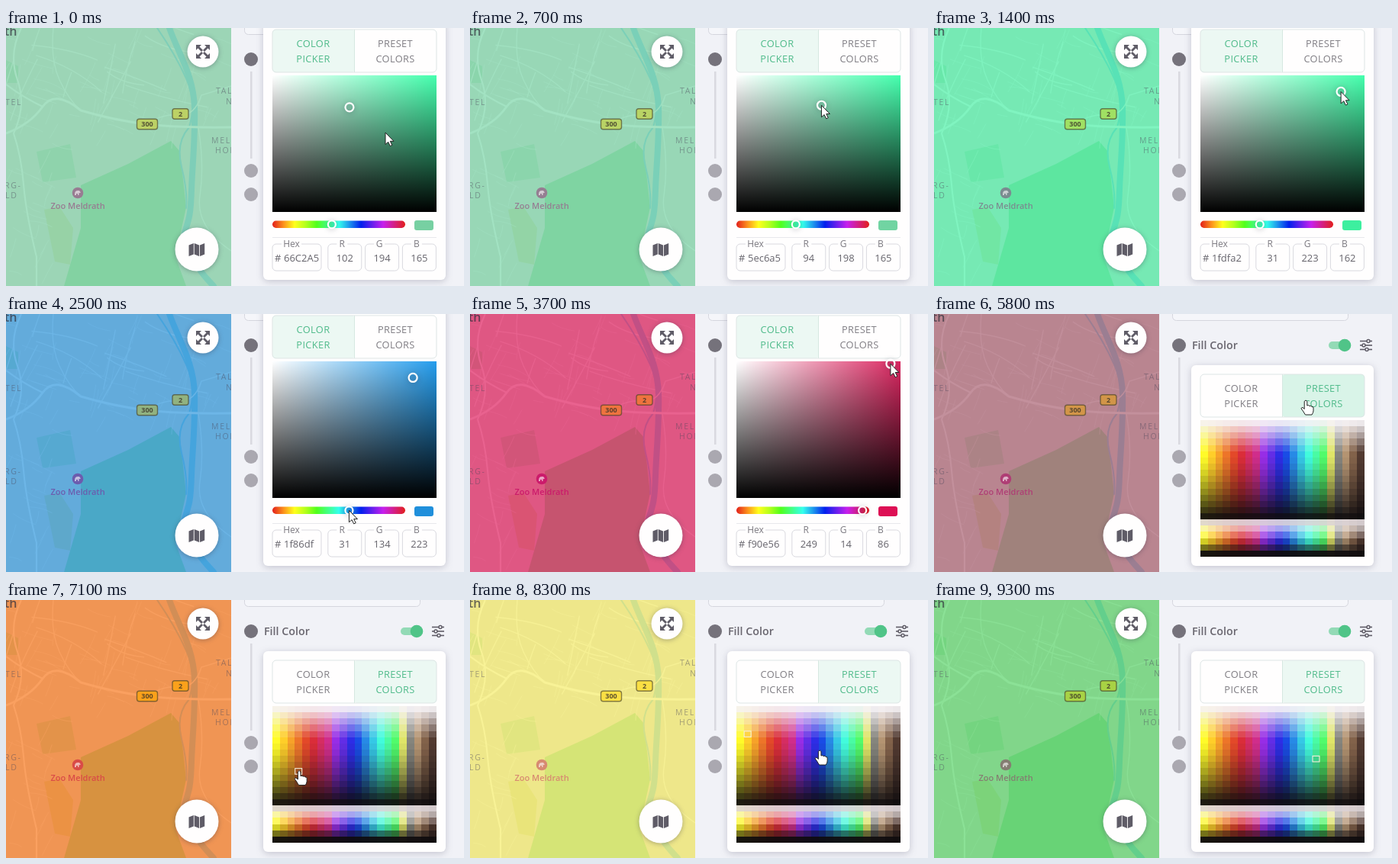
Recreate the animation shown at these times as an HTML page. Size 600 px wide and 338 px high, loop 9400 ms.

```html
<!DOCTYPE html>
<html lang="en">
<head>
<meta charset="utf-8">
<title>Map fill color</title>
<style>
  html, body { margin: 0; width: 100%; height: 100%; overflow: hidden; background: #f1f2f7; }
  svg { display: block; width: 100vw; height: 100vh; font-family: "Open Sans", "Noto Sans", sans-serif; }
  .card { filter: drop-shadow(0 2px 5px rgba(60, 60, 90, .25)); }
  .button { filter: drop-shadow(0 1px 3px rgba(40, 40, 60, .35)); }
  .tab { font-size: 12.8px; letter-spacing: .35px; text-anchor: middle; }
  .value { font-size: 13px; fill: #66646c; }
  .legend { font-size: 12px; fill: #7c7a81; text-anchor: middle; }
  .place { font-size: 10.5px; letter-spacing: 1.7px; fill: #4a465a; opacity: .45; }
  .shield { font-size: 9px; font-weight: 700; text-anchor: middle; fill: #3a3328; opacity: .8; }
  .city { font-size: 16px; font-weight: 600; fill: #30303c; opacity: .7; }
  .poi { font-size: 11px; font-weight: 600; text-anchor: middle; }
  .title { font-size: 14.3px; font-weight: 600; fill: #69666f; }
</style>
</head>
<body>
<svg id="stage" viewBox="0 0 600 338" preserveAspectRatio="none">
  <defs>
    <clipPath id="mapClip"><rect width="295" height="338"/></clipPath>
    <linearGradient id="white"><stop stop-color="#fff"/><stop offset="1" stop-color="#fff" stop-opacity="0"/></linearGradient>
    <linearGradient id="black" x2="0" y2="1"><stop stop-opacity="0"/><stop offset="1"/></linearGradient>
    <linearGradient id="hues"></linearGradient>
  </defs>
</svg>
<script>
const LOOP = 9400, STEP = 100;
const stage = document.getElementById('stage');

function add(parent, tag, attrs = {}, text) {
  const el = document.createElementNS('http://www.w3.org/2000/svg', tag);
  for (const k in attrs) el.setAttribute(k, attrs[k]);
  if (text !== undefined) el.textContent = text;
  return parent.appendChild(el);
}
const group = (parent, attrs) => add(parent, 'g', attrs);
const rect = (p, x, y, width, height, fill, more) => add(p, 'rect', { x, y, width, height, fill, ...more });
const circle = (p, cx, cy, r, fill, more) => add(p, 'circle', { cx, cy, r, fill, ...more });
const path = (p, d, more) => add(p, 'path', { d, fill: 'none', ...more });
const label = (p, x, y, text, cls, more) => add(p, 'text', { x, y, class: cls, ...more }, text);
const show = (el, on) => el.setAttribute('display', on ? 'inline' : 'none');

const clamp = (v, top = 1) => Math.min(top, Math.max(0, v));
const ease = k => k * k * (3 - 2 * k);
const mix = (a, b, k) => a.map((v, i) => v + (b[i] - v) * k);
const rgb = c => `rgb(${c.map(v => Math.round(v)).join(',')})`;
const fromHex = h => [0, 2, 4].map(i => parseInt(h.slice(i, i + 2), 16));
const toHex = c => c.map(n => n.toString(16).padStart(2, '0')).join('');

function hsv(h, s, v) {
  return [5, 3, 1].map(n => {
    const k = (n + h / 60 + 6) % 6;
    return 255 * v * (1 - s * clamp(Math.min(k, 4 - k)));
  });
}
function toHsv([r, g, b]) {
  const max = Math.max(r, g, b), d = max - Math.min(r, g, b);
  const sector = max === r ? (g - b) / d + 6 : max === g ? (b - r) / d + 2 : (r - g) / d + 4;
  return [sector % 6 * 60, d / max, max / 255];
}
const recorded = ([r, g, b]) => [.92 * r + .24 * g - .13 * b, 1.07 * g, .98 * b].map(v => clamp(v, 255));

let seed = 11;
const random = () => (seed = seed * 16807 % 2147483647) / 2147483647;

// Map
const map = group(stage, { 'clip-path': 'url(#mapClip)' });
rect(map, 0, 0, 295, 338, '#e2e0de');
path(map, 'M98 206L160 178 216 148 228 162 236 235 222 300 236 338H76L98 262Z', { fill: '#9cd8a4' });
path(map, 'M40 162L84 152 92 196 48 202ZM0 42L16 50V72H0Z', { fill: '#9cd8a4', opacity: .5 });
path(map, 'M50 238L70 234 88 262 84 310 64 306Z', { fill: '#d2d69c', opacity: .7 });

// A seeded web of streets: n strokes inside a box, bent by up to half their length
function streets(n, w, top, bottom, length, look) {
  let d = '';
  for (let i = 0; i < n; i++) {
    const a = (random() < .5 ? .2 : 1.75) + random() * .35, len = length * (.4 + random());
    const dx = Math.cos(a) * len, dy = Math.sin(a) * len, bend = (random() - .5) * len / 2;
    d += `M${random() * w} ${top + random() * (bottom - top)}q${dx / 2 - bend / 2} ${dy / 2 + bend / 2} ${dx} ${dy}`;
  }
  path(map, d, { stroke: '#fff', ...look });
}
streets(75, 280, 0, 140, 32, { 'stroke-width': .8, opacity: .6 });
streets(22, 65, 150, 330, 26, { 'stroke-width': .8, opacity: .6 });
streets(14, 190, -20, 80, 80, { 'stroke-width': 1.4, opacity: .8 });

const water = { stroke: '#8ecbe4', 'stroke-linecap': 'round' };
path(map, 'M214 0C226 34 246 62 247 105S244 180 243 212 240 250 234 268 256 322 272 338', { ...water, 'stroke-width': 8 });
path(map, 'M198 0Q222 35 236 66T240 130Q222 150 230 182T236 236', { ...water, 'stroke-width': 2 });
path(map, 'M0 138Q32 126 48 103T98 108Q142 121 184 126T295 130', { stroke: '#fff', 'stroke-width': 3 });
path(map, 'M20 0Q3 34 15 68T10 138Q20 168 23 205T40 300V338M0 74Q24 92 48 103', { stroke: '#fff', 'stroke-width': 2.2 });
path(map, 'M184 126Q205 112 226 114T256 88L295 76M252 130Q260 180 254 220T295 292M62 0Q58 42 70 68T98 108', { stroke: '#fff', 'stroke-width': 1.4, opacity: .85 });

const shields = [[185, 126, 27, '300'], [228.5, 112.5, 21, '2']];
const shield = ([x, y, w], more) => rect(map, x - w / 2, y - 6.7, w, 13.4, '#ffd52c', { rx: 3, ...more });
shields.forEach(s => shield(s));
const tint = rect(map, 0, 0, 295, 338, '#fff', { opacity: .65 });
shields.forEach(s => {
  shield(s, { 'fill-opacity': .25, stroke: '#4a4428', 'stroke-opacity': .65, 'stroke-width': 1.4 });
  label(map, s[0], s[1] + 3.3, s[3], 'shield');
});

[[-1, 101, 'TEL'], [-2, 210, 'RG-'], [-1, 223, 'LD'], [275, 86, 'TAL'], [288, 100, 'N'], [269, 151, 'MEL'], [274, 164, 'HOF']]
  .forEach(([x, y, text]) => label(map, x, y, text, 'place'));
label(map, -2, 10, 'th', 'city');

const poi = group(map);
circle(poi, 94, 216, 7.3);
path(poi, 'M90 218Q90 213 94 213H96L98 215.5 95.5 216.5V219H94V217H92V219H90Z', { fill: '#fff', opacity: .6 });
label(poi, 94, 237, 'Zoo Meldrath', 'poi');

const ICON = '#5f5c67';
circle(stage, 258, 31, 20.5, '#fffefe', { class: 'button' });
for (let turn = 0; turn < 360; turn += 90) {
  path(stage, 'M-9-9H-2L-4.5-6.5 0-2 -2 0-6.5-4.5-9-2Z', { fill: ICON, transform: `translate(258 31) rotate(${turn})` });
}
circle(stage, 250, 290, 28.5, '#fffefe', { class: 'button' });
[[239.5, 2.5], [246.7, -2.5], [253.9, 2.5]].forEach(([x, slope]) =>
  path(stage, `M${x} ${290.5 - 7.2 + slope / 2}l6.3 ${-slope}v14.5l-6.3 ${slope}Z`, { fill: ICON }));

// Side panel
rect(stage, 295, 0, 305, 338, '#f1f2f7');
rect(stage, 312.5, -20, 230, 28.5, '#f5f6fa', { rx: 5, stroke: '#d5d6de' });
rect(stage, 320, 57, 2.5, 114, '#d9d9e0');
[41, 187, 218].forEach((y, i) => circle(stage, 321, y, 9, i ? '#aaa8b0' : '#75727b'));
label(stage, 338, 46, 'Fill Color', 'title');
rect(stage, 517, 36, 29, 10, '#93dab6', { rx: 5 });
circle(stage, 538, 41, 8.3, '#50c488');
[569, 563, 567].forEach((x, i) => {
  const y = 35.5 + i * 5.5;
  rect(stage, 558, y - .8, 16, 1.6, ICON);
  circle(stage, x, y, 2, '#f1f2f7', { stroke: ICON, 'stroke-width': 1.4 });
});

function makeCard(top, active) {
  const g = group(stage), y = top + 12;
  rect(g, 337, top, 239, 330 - top, '#fffefe', { rx: 6, class: 'card' });
  const tab = rect(g, 349 + active * 107.5, y, 107.5, 56, '#ecf8f3', { rx: 4 });
  rect(g, 349, y, 215, 56, 'none', { rx: 5, stroke: '#dde5e5' });
  rect(g, 456, y, 1, 56, '#d6e8e1');
  ['COLOR', 'PICKER', 'PRESET', 'COLORS'].forEach((word, i) => {
    const side = i >> 1;
    label(g, 402.5 + side * 107.5, y + 22.5 + i % 2 * 20.5, word, 'tab', { fill: side === active ? '#50bb8b' : '#807e84' });
  });
  return { g, tab };
}

// Color picker
const picker = makeCard(-10, 0).g;
const shade = rect(picker, 349, 62, 215, 179);
rect(picker, 349, 62, 215, 179, 'url(#white)');
rect(picker, 349, 62, 215, 179, 'url(#black)');
for (let i = 0; i <= 12; i++) {
  add(document.getElementById('hues'), 'stop', { offset: i / 12, 'stop-color': rgb(recorded(hsv(i * 30, .88, .95))) });
}
rect(picker, 349, 252.5, 174, 9.5, 'url(#hues)', { rx: 4.7 });
const ringLook = { stroke: '#fff', 'stroke-width': 2.2, class: 'button' };
const ring = circle(picker, 0, 0, 5.5, 'none', ringLook);
const knob = circle(picker, 0, 0, 5, 'none', ringLook);
const swatch = rect(picker, 535, 252, 25, 13, '#fff', { rx: 3 });
rect(picker, 349, 274, 215, 1, '#e8e8ec');
const fields = ['Hex', 'R', 'G', 'B'].map((name, i) => {
  const x = i ? 373 + i * 48.8 : 349, w = i ? 44 : 64, gap = i ? 14 : 26;
  const mid = x + (i ? 18.5 : 25);
  rect(picker, x, 283, w, 35, 'none', { rx: 5, stroke: '#d9d9df' });
  rect(picker, mid - gap / 2, 281, gap, 4, '#fffefe');
  label(picker, mid, 287, name, 'legend');
  return label(picker, i ? x + w / 2 : 364, 305.5, '', 'value', { 'text-anchor': i ? 'middle' : 'start' });
});
label(picker, 352, 305.5, '#', 'value');

// Preset palette: a wheel of hues, then five earth tones
const { g: presets, tab: presetTab } = makeCard(67, 1);
const CELLS = 22, CW = 215 / CELLS, CH = 179 / CELLS;
const earth = ['dfe568', '85857d', 'b49472', '82624a', '523a30'].map(fromHex);
const hueOf = col => col < 8 ? 60 - 13 * col : 429 - 18 * col;
const columnColor = col => earth[col - 17] || recorded(hsv((hueOf(col) + 360) % 360, .82, .92));
function presetColor(col, row) {
  const c = columnColor(col), light = [246, 243, 246], dark = [14, 11, 13];
  if (row < 5) return mix(light, c, (row + .3) / 5);
  if (row < 16) return mix(c, dark, ((row - 5) / 10.5) ** 1.4);
  if (row === 16) return mix([222, 214, 218], c, .08);
  return row < 19 ? mix(light, c, (row - 15.8) / 3) : mix(c, dark, (row - 18.5) / 2.6);
}
const cellX = col => 349 + col * CW, cellY = row => 139 + row * CH;
for (let i = 0; i < CELLS * CELLS; i++) {
  const col = i % CELLS, row = Math.floor(i / CELLS);
  rect(presets, cellX(col), cellY(row), CW, CH, rgb(presetColor(col, row)), { 'shape-rendering': 'crispEdges' });
}
const picked = rect(presets, 0, 0, CW - .8, CH - .6, 'none', { stroke: '#f4eedc', 'stroke-width': 1.1 });

// Pointers, tips at 0,0
const ink = { fill: '#fff', stroke: '#222', 'stroke-linejoin': 'round' };
const arrow = path(stage, 'M0 0V15.5L3.7 12.3 6.2 17.6 8.8 16.4 6.3 11.3H11Z', ink);
const hand = path(stage, 'M-1.8 1.4Q0-1.4 1.8 1.4V7Q4 5.8 5 7.6 7 6.5 8 8.5 10 8 10 10V14Q9.8 16.5 8 19H-.5Q-2 17-3 15L-6 10.8Q-5.4 8.2-3 10.2L-1.8 11.5Z', ink);

// Story: where the pointer goes, and which color it drags or clicks on the way
const MINT = '66C2A5';
const [mint, green, pink, mauve] = [MINT, '1fdfa2', 'f90e56', 'ad4f6a'].map(h => toHsv(fromHex(h)));
const ringAt = ([, s, v]) => [348 + s * 215, 61 + (1 - v) * 179];
const knobAt = ([h]) => [349 + h / 360 * 174, 257.3];
const cellAt = ([col, row]) => [cellX(col + .6), cellY(row + .4)];

const START = [497, 137], DRAG = 500, SWITCH = 5400, GONE = 9000, FADE = 300;
const moves = [
  { at: 0, ms: 500, to: ringAt(mint) },
  { at: DRAG, ms: 900, to: ringAt(green), color: green },
  { at: 1700, ms: 600, to: knobAt(green) },
  { at: 2300, ms: 600, to: knobAt(pink), color: [pink[0], green[1], green[2]] },
  { at: 2900, ms: 300, to: ringAt(green) },
  { at: 3200, ms: 400, to: ringAt(pink), color: pink },
  { at: 3900, ms: 700, to: ringAt(mauve), color: mauve },
  { at: 4800, ms: 400, to: [487, 40] },
  { at: SWITCH, ms: 300, to: [487, 113] },
  ...[
    { at: 5900, ms: 700, cell: [3, 10], fill: [248, 110, 12] },
    { at: 7200, ms: 400, cell: [1, 4], fill: [245, 235, 95] },
    { at: 7800, ms: 800, cell: [15, 8], fill: [78, 210, 95] }
  ].map(m => ({ ...m, to: cellAt(m.cell) }))
];

function stateAt(t) {
  let tip = START, color = mint, cell = null, clicks = [];
  for (const m of moves.filter(m => t >= m.at)) {
    const k = ease(clamp((t - m.at) / m.ms)), click = m.at + m.ms + 100;
    tip = mix(tip, m.to, k);
    if (m.color) color = mix(color, m.color, k);
    if (m.cell && t >= click) {
      cell = m.cell;
      clicks.push([m.fill, clamp((t - click) / FADE)]);
    }
  }
  const fill = clicks.reduce((c, [to, k]) => mix(c, to, k), recorded(hsv(...color)));
  return { tip, color, cell, fill };
}

function drawPicker(color, t) {
  const c = hsv(...color).map(Math.round), [x, y] = ringAt(color), [kx, ky] = knobAt(color);
  shade.setAttribute('fill', rgb(recorded(hsv(color[0], .85, .95))));
  ring.setAttribute('transform', `translate(${x} ${y})`);
  knob.setAttribute('transform', `translate(${kx} ${ky})`);
  swatch.setAttribute('fill', rgb(recorded(c)));
  [t <= DRAG ? MINT : toHex(c), ...c].forEach((text, i) => { fields[i].textContent = text; });
}

function draw(t) {
  const { tip, color, cell, fill } = stateAt(t), inPicker = t < SWITCH, pointing = t >= 5100;
  show(picker, inPicker);
  show(presets, !inPicker);
  if (inPicker) drawPicker(color, t);

  tint.setAttribute('fill', rgb(fill));
  poi.setAttribute('fill', rgb(mix(fill, [185, 40, 130], .5)));
  show(picked, cell);
  if (cell) picked.setAttribute('transform', `translate(${cellX(cell[0]) + .4} ${cellY(cell[1]) + .3})`);

  show(arrow, !pointing);
  show(hand, pointing && t < GONE);
  for (const p of [arrow, hand]) p.setAttribute('transform', `translate(${tip})`);
  presetTab.setAttribute('fill', t < 6100 ? '#d9f4e8' : '#ecf8f3');
}

const start = performance.now();
function tick() {
  const t = (performance.now() - start) % LOOP;
  draw(Math.floor(t / STEP) * STEP);
  requestAnimationFrame(tick);
}
tick();
</script>
</body>
</html>
```
